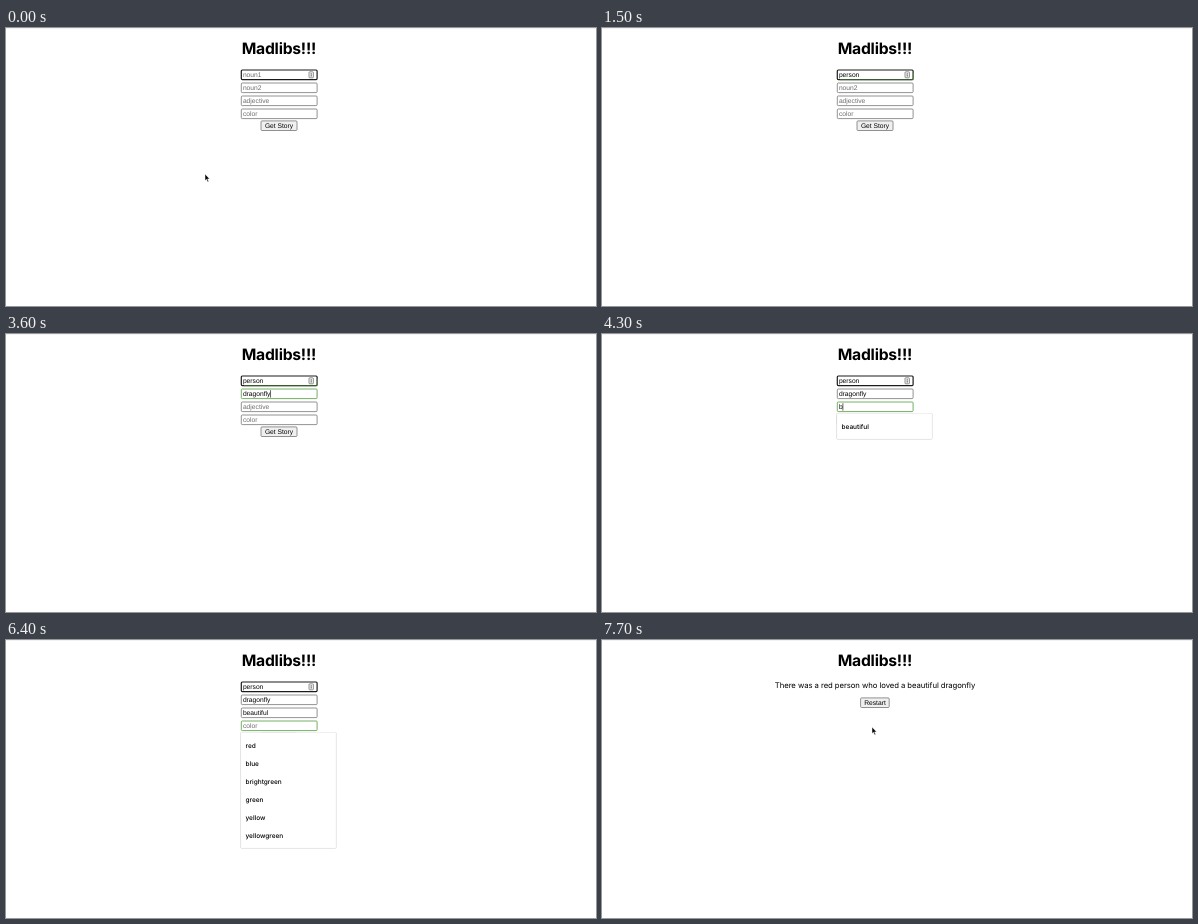
Recreate the animation shown at these times as an HTML page. Size 590x278 px, loop 8000 ms.

```html
<!DOCTYPE html>
<html lang="en">
<head>
<meta charset="utf-8">
<title>Madlibs</title>
<style>
  html, body { margin: 0; width: 100%; height: 100%; overflow: hidden; background: #fff; }
  svg { display: block; width: 590px; height: 278px; }
  text { font: 6.7px "Liberation Sans", Arial, sans-serif; fill: #000; white-space: pre; text-rendering: geometricPrecision; }
  .title { font: 700 15.7px Inter, sans-serif; letter-spacing: -.015em; text-anchor: middle; }
  .story { font: 7.72px Inter, sans-serif; letter-spacing: -.008em; text-anchor: middle; }
  .option { font: 500 6.5px Inter, sans-serif; }
  .label { text-anchor: middle; }
  .hint { fill: #6c6c6c; }
  .box { fill: #fff; stroke: #777; stroke-width: .8; }
  .first { stroke: #1c1c1c; stroke-width: 1.2; }
  .focus { stroke: #66a852; stroke-width: .9; }
  .trace { fill: none; stroke: #5f9a4a; stroke-width: .7; }
  .button { fill: #f0f0f0; stroke: #777; stroke-width: .8; }
  .pressed { fill: #dcdcdc; }
  .icon { fill: #f4f4f4; stroke: #666; stroke-width: .7; }
  .panel { fill: #fff; stroke: #eaeaea; stroke-width: .4; filter: drop-shadow(0 .9px .7px rgba(0, 0, 0, .3)); }
  .arrow { fill: #000; stroke: #fff; stroke-width: .5; }
  .beam { fill: none; stroke: #111; stroke-width: .9; }
</style>
</head>
<body>
<svg viewBox="0 0 590 278">
  <rect width="590" height="1" fill="#f2f2f2"/>
  <text class="title" x="272.9" y="26">Madlibs!!!</text>
  <g id="scene"></g>
</svg>
<script>
const LOOP = 8000, STEP = 100, SUBMIT = 7100, BLINK = 500;
const scene = document.getElementById("scene");

// keys: [time, letters typed so far]; focus and open: [from, to]
const fields = [
  { hint: "noun1", word: "person", focus: [700, 1500], open: [700, 1500],
    keys: [[1100, 1], [1200, 2], [1300, 3], [1500, 6]],
    options: ["sjkf", "banana", "person"] },
  { hint: "noun2", word: "dragonfly", focus: [1900, 3800], open: [2000, 3600],
    keys: [[2300, 1], [2600, 3], [2800, 4], [3000, 6], [3200, 7], [3400, 8], [3600, 9]],
    options: ["sfsv", "mama", "dragonfly"] },
  { hint: "adjective", word: "beautiful", focus: [3800, 5900], open: [4100, 5700],
    keys: [[4300, 1], [4500, 2], [4700, 3], [4900, 4], [5100, 5], [5200, 6], [5300, 7], [5400, 8], [5600, 9]],
    options: ["silly", "happy", "beautiful", "tiny", "loud", "funny"] },
  { hint: "color", word: "red", focus: [5900, 6800], open: [6100, 6700],
    keys: [[6500, 1], [6600, 2], [6700, 3]],
    options: ["red", "blue", "brightgreen", "green", "yellow", "yellowgreen"] }
];

// [time, shape, x, y]
const pointer = [
  [0, "arrow", 199, 146], [100, "arrow", 207, 131], [200, "arrow", 224, 97],
  [300, "arrow", 238, 60], [400, "beam", 242.5, 47], [1100, "none"],
  [1700, "beam", 249, 49], [1800, "beam", 253, 55], [1900, "beam", 256, 59], [2300, "none"],
  [6800, "arrow", 271, 95], [7600, "arrow", 270.5, 91], [7700, "arrow", 270, 87]
];

const within = (t, [from, to]) => t >= from && t < to;
const latest = (list, t) => list.filter(item => item[0] <= t).pop();

function add(tag, attrs, content = "") {
  const el = document.createElementNS("http://www.w3.org/2000/svg", tag);
  for (const name in attrs) el.setAttribute(name, attrs[name]);
  el.textContent = content;
  scene.append(el);
  return el;
}

const rect = (cls, x, y, width, height, rx = 1) =>
  add("rect", { class: cls, x, y, width, height, rx });
const text = (cls, x, y, content) => add("text", { class: cls, x, y }, content);

function typed(field, t) {
  const key = latest(field.keys, t);
  return key ? field.word.slice(0, key[1]) : "";
}

// the blink restarts with every key
function caretOn(field, t) {
  const [since] = latest(field.keys, t) || field.focus;
  return (t - since) % (2 * BLINK) < BLINK;
}

function drawField(field, i, t) {
  const y = 42 + 13 * i;
  const value = typed(field, t);
  const focused = within(t, field.focus);
  rect("box" + (focused ? " focus" : i ? "" : " first"), 235.3, y, 75.8, 9.6);
  if (i === 0) {
    if (within(t, [1500, 4100])) add("path", { class: "trace", d: `M238 ${y + 9.8}H311.3V${y + 3}` });
    rect("icon", 303, y + 1.8, 4.4, 6, .8);
    add("path", { class: "beam", d: `M305.2 ${y + 3.4}v1.1m0 .8v1.1` });
  }
  const label = text(value ? "" : "hint", 236.9, y + 7.1, value || field.hint);
  if (focused && caretOn(field, t)) {
    const end = value ? label.getComputedTextLength() : 0;
    rect("", 236.9 + end, y + 1.2, .6, 7.4, 0);
  }
}

function drawPanel(field, i, t) {
  const list = field.options.filter(option => option.startsWith(typed(field, t)));
  const y = 53.2 + 13 * i;
  rect("panel", 234.7, y, 95.4, 8 + 18 * list.length);
  list.forEach((option, n) => text("option", 239.5, y + 15.6 + 18 * n, option));
}

function drawForm(t) {
  fields.forEach((field, i) => drawField(field, i, t));
  rect(t >= 6900 ? "button pressed" : "button", 255, 92.9, 36, 9.6);
  text("label", 273, 100.1, "Get Story");
  fields.forEach((field, i) => within(t, field.open) && drawPanel(field, i, t));
}

function drawStory() {
  const [noun, other, adjective, color] = fields.map(field => field.word);
  text("story", 273, 47.8, `There was a ${color} ${noun} who loved a ${adjective} ${other}`);
  rect("button", 258.6, 57.9, 28.6, 9.6);
  text("label", 273, 65.1, "Restart");
}

function drawPointer(t) {
  const [, shape, x, y] = latest(pointer, t);
  if (shape === "none") return;
  const d = shape === "arrow"
    ? "M0 0V6.6L1.5 5.3L2.6 8L3.7 7.5L2.6 4.9H4.6Z"
    : "M-1.4 -3.6Q0 -3.6 0 -2.6V2.8Q0 3.8 -1.4 3.8M1.4 -3.6Q0 -3.6 0 -2.6M0 2.8Q0 3.8 1.4 3.8";
  add("path", { class: shape, d, transform: `translate(${x} ${y})` });
}

function draw(t) {
  scene.replaceChildren();
  if (t < SUBMIT) drawForm(t);
  else drawStory();
  drawPointer(t);
}

const start = performance.now();
let shown = -1;

function tick() {
  // a small lead keeps each step on its boundary
  const elapsed = performance.now() - start + 20;
  const t = Math.floor(elapsed % LOOP / STEP) * STEP;
  if (t !== shown) draw(shown = t);
  requestAnimationFrame(tick);
}
tick();
</script>
</body>
</html>
```
